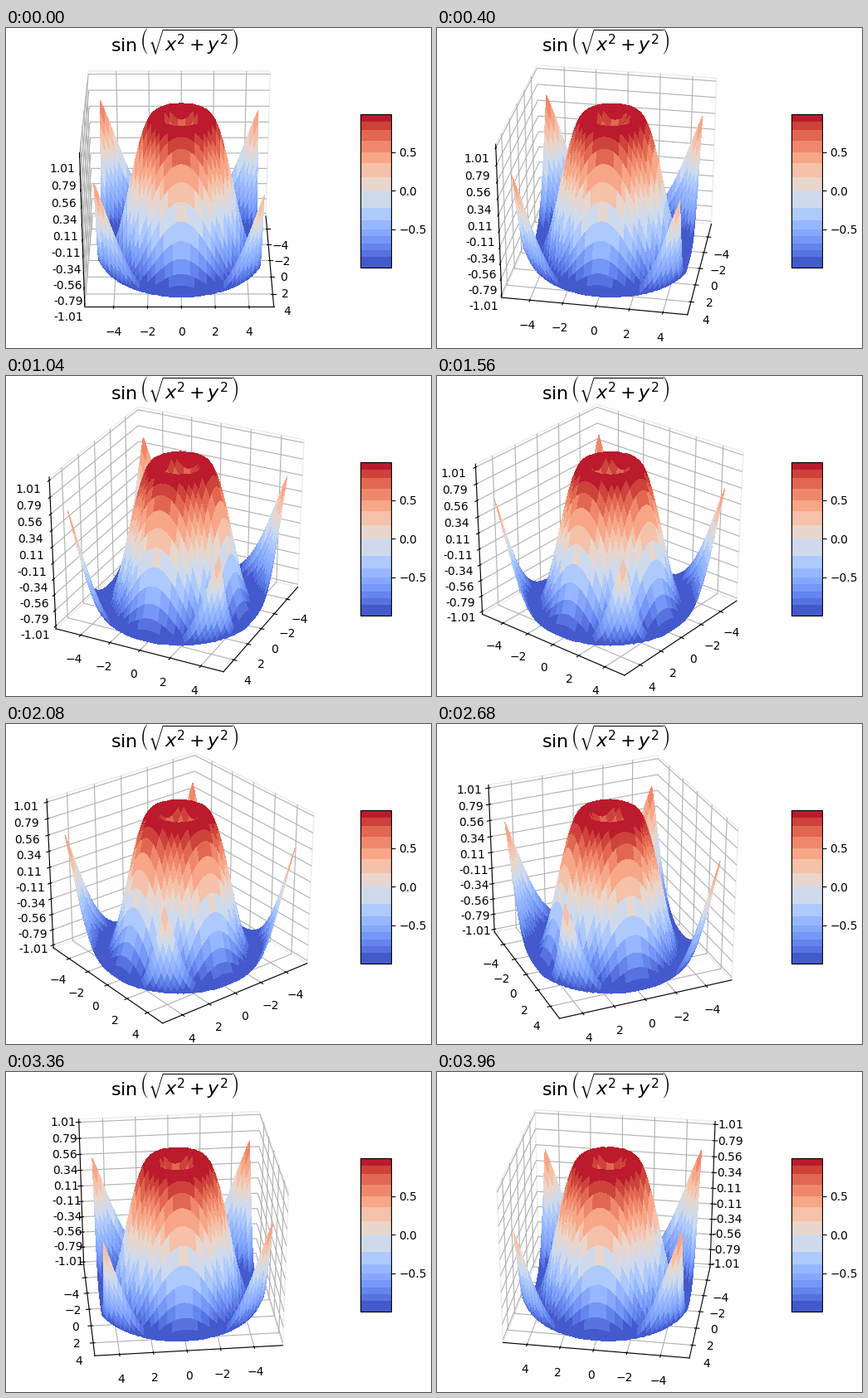
Recreate the animation shown at these times as a matplotlib script. Size 512 px wide and 386 px high, loop 4000 ms.

```python
import numpy as np
import matplotlib.pyplot as plt
from matplotlib.animation import FuncAnimation
from matplotlib.colors import ListedColormap
from matplotlib.ticker import FixedLocator, FormatStrFormatter

W, H, DPI = 512, 386, 100
FRAMES, INTERVAL = 100, 40
PAPER = "#fefefe"


def rect(x, y, w, h):
    """Pixel box, measured from the bottom left, in figure fractions."""
    return [x / W, y / H, w / W, h / H]


def banded(base, edges):
    """Colour map with flat steps between the given edges."""
    mids = (edges[:-1] + edges[1:]) / 2
    band = np.searchsorted(edges[1:-1], np.linspace(0, 1, 256))
    return ListedColormap(base(mids)[band])


edges = np.array([0, 13, 21, 29, 38, 46, 56, 72, 93,
                  109, 126, 139, 153, 166, 177, 185]) / 185
cmap = banded(plt.get_cmap("coolwarm"), edges)

fig = plt.figure(figsize=(W / DPI, H / DPI), dpi=DPI, facecolor=PAPER)
ax = fig.add_axes(rect(5, 4.8, 396.8, 369.6), projection="3d")
ax.apply_aspect = lambda position=None: None  # let the view fill its box
ax.set_facecolor("none")

grid = np.arange(-5, 5, 0.25)
X, Y = np.meshgrid(grid, grid)
Z = np.sin(np.hypot(X, Y))
surf = ax.plot_surface(X, Y, Z, cmap=cmap, linewidth=0, antialiased=False)

# A cube, with a small gap between the data range and the walls
GAP = 25 / 24
mid, half = -0.125, 9.75 * 1.1 / 2 * GAP
ax.set_xlim(mid - half, mid + half)
ax.set_ylim(mid - half, mid + half)
ax.set_zlim(-1.01 * GAP, 1.01 * GAP)
ax.set_box_aspect((1, 1, 1), zoom=np.sqrt(3) / 1.8294640721620434)

for axis in (ax.xaxis, ax.yaxis):
    axis.set_major_locator(FixedLocator(np.arange(-4, 5, 2)))
ax.zaxis.set_major_locator(FixedLocator(np.linspace(-1.01, 1.01, 10)))
ax.zaxis.set_major_formatter(FormatStrFormatter("%.02f"))
for axis in (ax.xaxis, ax.yaxis, ax.zaxis):
    axis.pane.set_alpha(1)
    axis.pane.set_facecolor("none")
    axis.pane.set_edgecolor("#ececec")

cax = fig.add_axes(rect(426.6, 97.2, 36.96, 184.8))
fig.colorbar(surf, cax=cax, ticks=[-0.5, 0, 0.5])

fig.text(203.4 / W, 1 - 28 / H, r"$\sin\left(\sqrt{x^2+y^2}\right)$",
         fontsize=16, ha="center", va="baseline")


def update(i):
    # One degree per frame, kept just inside 0 and 90 so the walls don't flip
    ax.view_init(elev=30, azim=45 + (i - 45) * (1 - 1e-7))
    return []


anim = FuncAnimation(fig, update, frames=FRAMES, interval=INTERVAL,
                     repeat=True, repeat_delay=0)
plt.show()
```
